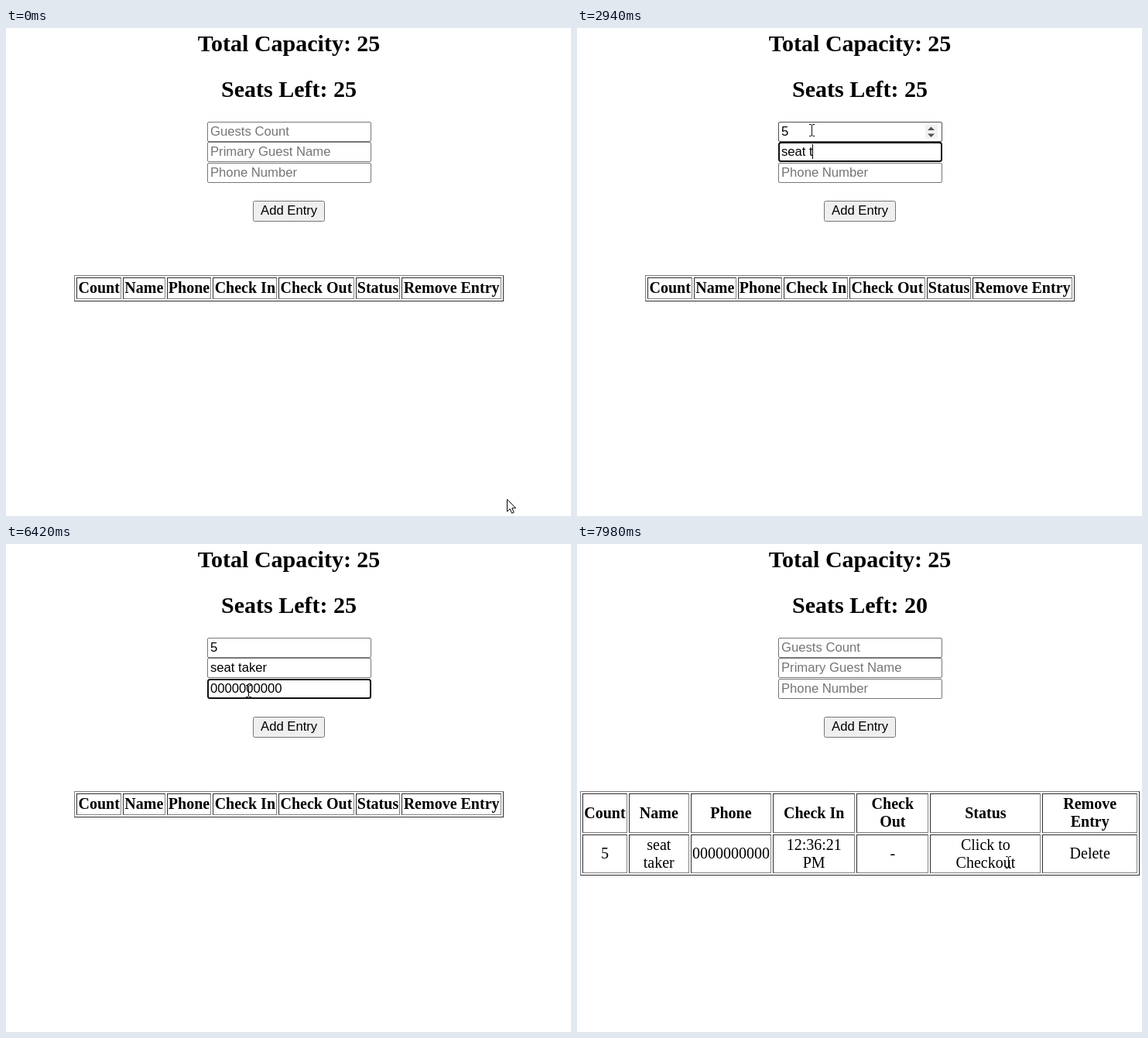
Recreate the animation shown at these times as an HTML page. Size 730 by 630 pixels, loop 8 s.

```html
<!DOCTYPE html>
<html lang="en">
<head>
<meta charset="utf-8">
<title>Guest check-in</title>
<style>
  html, body { margin: 0; width: 100%; height: 100%; overflow: hidden; background: #fff; }
  svg { position: absolute; left: 0; top: 0; width: 730px; height: 630px; }
  text { white-space: pre; }
  .heading { font: bold 30px "Liberation Serif", "Times New Roman", serif; text-anchor: middle; }
  .sans { font: 16.667px "Liberation Sans", Arial, sans-serif; }
  .list { position: absolute; left: 4px; top: 319px; width: 723px; }
  table { margin: 0 auto; border: 1px outset gray; border-spacing: 2px; text-align: center;
          font: 20px/23px "Liberation Serif", "Times New Roman", serif; }
  th, td { border: 1px inset gray; padding: 1.25px; }
</style>
</head>
<body>
<svg id="form"></svg>
<div class="list"><table id="list"></table></div>
<svg id="pointer">
  <radialGradient id="glow">
    <stop offset=".85" stop-color="#fff000" stop-opacity=".65"/>
    <stop offset="1" stop-color="#fff000" stop-opacity="0"/>
  </radialGradient>
</svg>
<script>
const LOOP = 8000, BLINK = 530, HOP = 69, MID = 365.6, TEXT_X = 264;
const GUEST = 'seat taker', PHONE = '0000000000';
const CLICK_FIELD = 1080, CLICK_BUTTON = 7030, SUBMIT = 7090;

const form = document.getElementById('form');
const pointer = document.getElementById('pointer');
const list = document.getElementById('list');

function set(node, attrs) {
  for (const k in attrs) node.setAttribute(k, attrs[k]);
  return node;
}
function add(parent, tag, attrs) {
  return parent.appendChild(set(document.createElementNS('http://www.w3.org/2000/svg', tag), attrs));
}
function label(str, attrs) {
  const node = add(form, 'text', attrs);
  node.textContent = str;
  return node;
}
const show = (node, on) => node.setAttribute('visibility', on ? 'visible' : 'hidden');
const inside = (x, y, left, top, w, h) => x >= left && x < left + w && y >= top && y < top + h;

// Headings
label('Total Capacity: 25', { x: MID, y: 30, class: 'heading' });
const seats = label('', { x: MID, y: 89, class: 'heading' });

// Fields: focused from `focus` until `blur`, typed evenly from `from` to `to`
const fields = [
  { hint: 'Guests Count', value: '5', focus: CLICK_FIELD, from: 1680, to: 1680, blur: 1810 },
  { hint: 'Primary Guest Name', value: GUEST, focus: 1810, from: 2080, to: 3475, blur: 3540 },
  { hint: 'Phone Number', value: PHONE, focus: 3540, from: 4140, to: 5620, blur: CLICK_BUTTON }
];
fields.forEach((f, i) => {
  f.top = Math.round(120.6 + 26.6 * i);
  f.base = f.top + 18;
  f.frame = add(form, 'rect', { fill: '#fff' });
  f.text = label('', { x: TEXT_X, y: f.base, class: 'sans' });
  f.gap = (f.to - f.from) / (f.value.length - 1) || 1;
});
const spinner = add(form, 'g', {});
add(spinner, 'rect', { x: 450, y: 125, width: 16, height: 18, fill: '#f1f1f1' });
add(spinner, 'path', { d: 'M453 132l4.5 -4.5l4.5 4.5zM453 136.5l4.5 4.5l4.5 -4.5z', fill: '#505050' });
const caret = add(form, 'rect', { width: 1, height: 19 });

// Button
const button = add(form, 'rect', { x: 319.5, y: 223.5, width: 92, height: 26, rx: 2 });
label('Add Entry', { x: MID, y: 241, class: 'sans', 'text-anchor': 'middle' });

// Guest list
function addRow(tag, cells) {
  const row = list.insertRow();
  for (const cell of cells) row.appendChild(document.createElement(tag)).textContent = cell;
  return row;
}
addRow('th', ['Count', 'Name', 'Phone', 'Check In', 'Check Out', 'Status', 'Remove Entry']);
const entry = addRow('td', ['5', GUEST, PHONE, '12:36:21 PM', '-', 'Click to Checkout', 'Delete']);

// Pointer
const halo = add(pointer, 'circle', { r: 16, fill: 'url(#glow)' });
const arrow = add(pointer, 'path', {
  d: 'M.5 .5V16.2L4.2 12.8L6.6 18.4L9.2 17.3L6.8 11.8H11.6Z', fill: '#fff', stroke: '#000'
});
const beam = add(pointer, 'path', {
  d: 'M-3 -7.5H-1L.5 -6.5L2 -7.5H4M.5 -6.5V6.5M-3 7.5H-1L.5 6.5L2 7.5H4', fill: 'none', stroke: '#111'
});

// Each move bends from `a` past `bend` to `b`
const moves = [
  { start: 0, end: 620, a: [647, 608], bend: [380, -40], b: [303, 132] },
  { start: 6280, end: 6830, a: [303, 132], bend: [335, 340], b: [349, 241] },
  { start: 7630, end: 7980, a: [349, 241], bend: [440, 320], b: [557, 411] }
];
const ease = u => u * u * (3 - 2 * u);

function pointerAt(t) {
  const { start, end, a, bend, b } = moves.filter(m => t >= m.start).pop();
  const hops = Math.round((end - start) / HOP);
  const u = ease(Math.min(1, Math.floor(hops * (t - start) / (end - start)) / hops));
  return a.map((p, i) => (1 - u) ** 2 * p + 2 * u * (1 - u) * bend[i] + u * u * b[i]);
}

const pen = document.createElement('canvas').getContext('2d');
pen.font = '16.667px "Liberation Sans", Arial, sans-serif';

function drawField(f, t, over) {
  const focused = t >= f.focus && t < f.blur;
  const count = t < f.from ? 0 : Math.min(f.value.length, 1 + Math.floor((t - f.from) / f.gap));
  const typed = t < SUBMIT ? f.value.slice(0, count) : '';
  const w = focused ? 2 : 1;
  set(f.frame, {
    x: 260 + w / 2, y: f.top + w / 2, width: 212 - w, height: 26 - w, rx: w + .5, 'stroke-width': w,
    stroke: focused ? '#101010' : over ? '#4f4f4f' : '#767676'
  });
  f.text.textContent = typed || f.hint;
  f.text.setAttribute('fill', typed ? '#000' : '#757575');
  if (focused) {
    const lastKey = count ? f.from + (count - 1) * f.gap : f.focus;
    set(caret, { x: Math.floor(TEXT_X + pen.measureText(typed).width), y: f.base - 15 });
    show(caret, Math.floor((t - lastKey) / BLINK) % 2 === 0);
  }
}

function draw(t) {
  const [x, y] = pointerAt(t);
  const done = t >= SUBMIT;
  const pressed = (t >= CLICK_FIELD && t < CLICK_FIELD + HOP) || (t >= CLICK_BUTTON && !done);
  const over = fields.map(f => inside(x, y, 260, f.top, 212, 26));

  show(caret, false);
  fields.forEach((f, i) => drawField(f, t, over[i]));
  show(spinner, over[0]);

  const hot = inside(x, y, 319, 223, 93, 27);
  set(button, {
    fill: !hot ? '#efefef' : pressed ? '#f5f5f5' : '#e5e5e5',
    stroke: !hot ? '#767676' : pressed ? '#8d8d8d' : '#4f4f4f'
  });

  seats.textContent = 'Seats Left: ' + (done ? 20 : 25);
  entry.hidden = !done;

  const overText = over.includes(true) || inside(x, y, 278, 62, 175, 35) ||
    (done && inside(x, y, 489, 399, 78, 24));
  for (const node of [halo, arrow, beam]) {
    node.setAttribute('transform', `translate(${Math.round(x)} ${Math.round(y)})`);
  }
  show(halo, pressed);
  show(arrow, !overText);
  show(beam, overText);
}

const start = performance.now();
function tick() {
  draw((performance.now() - start) % LOOP);
  requestAnimationFrame(tick);
}
tick();
</script>
</body>
</html>
```
